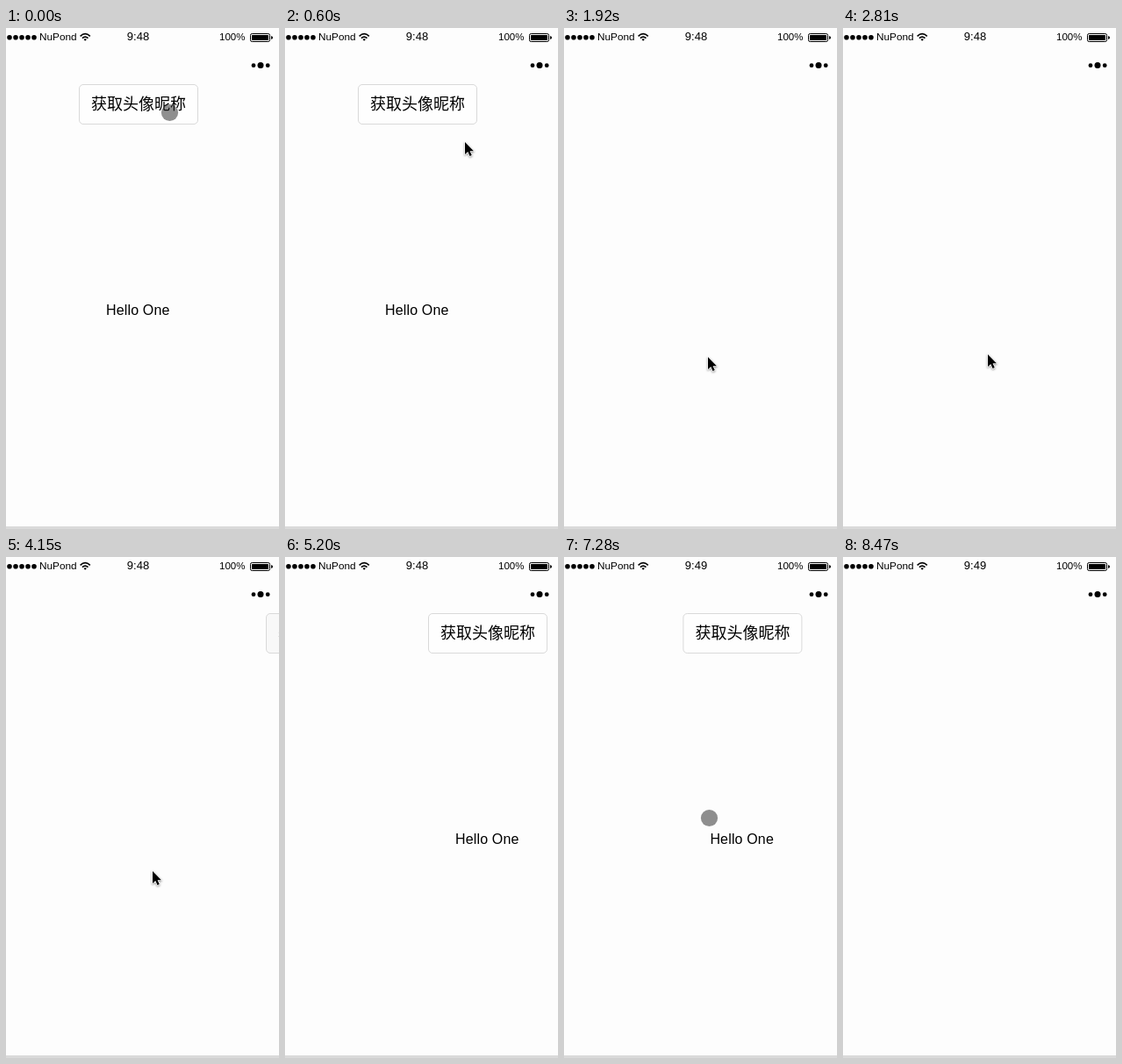
An HTML page for the animation above (8.99 s loop, 311 by 571 pixels).

```html
<!DOCTYPE html>
<html lang="zh-CN">
<head>
<meta charset="utf-8">
<title>Phone screen</title>
<style>
html, body { margin: 0; width: 100%; height: 100%; overflow: hidden; background: #fdfdfd; }
svg { display: block; }
text { font-family: "Liberation Sans", Arial, sans-serif; fill: #000; }
.cjk { font-family: "Noto Sans CJK SC", "Noto Sans CJK", sans-serif; }
.small { font-size: 11.5px; }
.hello { font-size: 16px; letter-spacing: .16px; }
#frame { fill: #fefefe; stroke: #d9d9d9; }
#frame.grey { fill: #f8f8f8; }
#arrow path { filter: drop-shadow(0 1px .8px rgba(0, 0, 0, .4)); }
</style>
</head>
<body>
<svg width="311" height="571" viewBox="0 0 311 571">
  <defs>
    <clipPath id="round"><circle cx="151" cy="99" r="27"/></clipPath>
    <linearGradient id="sky" x2="0" y2="1">
      <stop offset="0" stop-color="#a9c9b4"/>
      <stop offset="1" stop-color="#7fa878"/>
    </linearGradient>
    <linearGradient id="field" x2="0" y2="1">
      <stop offset="0" stop-color="#a0b836"/>
      <stop offset=".5" stop-color="#86ad1c"/>
      <stop offset="1" stop-color="#6f9410"/>
    </linearGradient>
  </defs>

  <rect width="311" height="571" fill="#fdfdfd"/>
  <rect y="568" width="311" height="3" fill="#dadada"/>

  <g id="status">
    <path d="M4 10.7h28.1" stroke="#000" stroke-width="5.6" stroke-linecap="round" stroke-dasharray="0 7"/>
    <text class="small" x="38" y="14" style="font-size:11.8px">NuPond</text>
    <g fill="none" stroke="#000" stroke-width="1.6">
      <path d="M84.6 9.3Q90.2 4.1 95.8 9.3M86.9 11.7Q90.2 8.6 93.5 11.7"/>
      <path d="M88.5 12.9Q90.2 11.5 91.9 12.9L90.2 14.7Z" fill="#000" stroke="none"/>
    </g>
    <text id="clock" x="150.5" y="14" text-anchor="middle" font-size="13">9:48</text>
    <text class="small" x="243" y="14">100%</text>
    <rect x="278.5" y="6.5" width="22" height="9" rx="1.8" fill="none" stroke="#000"/>
    <rect x="280" y="8" width="19" height="6" rx=".6"/>
    <path d="M302 9q2 .4 2 2t-2 2z"/>
  </g>
  <circle cx="282" cy="42.7" r="2.4"/>
  <circle cx="290" cy="42.5" r="3.5"/>
  <circle cx="298.2" cy="42.7" r="2.4"/>

  <g id="page">
    <g id="button">
      <rect id="frame" x="83.5" y="64.5" width="135" height="45" rx="4.5"/>
      <text class="cjk" x="97" y="93" font-size="18">获取头像昵称</text>
    </g>
    <g id="profile">
      <g clip-path="url(#round)">
        <rect x="124" y="72" width="54" height="30" fill="url(#sky)"/>
        <path d="M124 85Q136 79 147 88T178 82V104H124Z" fill="#6b9a80"/>
        <path d="M152 94Q166 80 178 79V104H140Z" fill="#56804a"/>
        <rect x="124" y="101" width="54" height="26" fill="url(#field)"/>
        <path d="M124 98h9l3-2 4 2h8l3-2 4 2h7l3-2 4 2h9v5h-54z" fill="#714f31"/>
        <path d="M140 97h8v4h-8zM155 98h6v4h-6zM168 97h5v4h-5z" fill="#b74c2c"/>
        <path d="M124 109q10-5 22-2l-22 4z" fill="#bf7431"/>
        <path d="M128 115q24-9 50-4v3q-25-5-50 1z" fill="#b8cb49"/>
      </g>
      <text class="cjk" x="103" y="151" font-size="16" style="fill:#aaa">禾禾（岑禾）</text>
    </g>
    <text class="hello" id="hello" x="114" y="327">Hello One</text>
  </g>

  <g id="pointer">
    <g id="touch"><circle r="9.6" fill="#202020" fill-opacity=".5"/></g>
    <g id="arrow">
      <path d="M0 0V14L3.3 11 5.5 16 7.8 15 5.6 10.2H10Z" stroke="#fff" stroke-width="1.6" stroke-linejoin="round" paint-order="stroke"/>
    </g>
    <g id="beam" fill="none">
      <path d="M-3.5-7.5Q0-7.5 0-5V5Q0 7.5-3.5 7.5M3.5-7.5Q0-7.5 0-5M0 5Q0 7.5 3.5 7.5M-2 3H2" stroke="#fff" stroke-width="2.4" stroke-opacity=".7"/>
      <path d="M-3.5-7.5Q0-7.5 0-5V5Q0 7.5-3.5 7.5M3.5-7.5Q0-7.5 0-5M0 5Q0 7.5 3.5 7.5M-2 3H2" stroke="#333"/>
    </g>
  </g>
</svg>
<script>
const LOOP = 8990;
const $ = id => document.getElementById(id);

// [start ms, view, horizontal shift]
const pages = [
  [0, 'button', 0], [300, 'grey', 0], [450, 'button', 0],
  [750, 'profile', 0], [1480, '', 0],
  [3260, 'grey', 80], [3410, '', 0],
  [4150, 'grey', 213], [4300, '', 0],
  [5200, 'button', 80], [5350, 'button', 0], [6390, '', 0],
  [7280, 'button', 52.4], [7430, '', 0],
  [8020, 'button', 130], [8170, '', 0]
];

// [start ms, kind, x, y]
const pointers = [
  [0, 'touch', 186.5, 96.5], [450, 'arrow', 189, 95],
  [600, 'arrow', 205, 130], [750, 'arrow', 211, 196],
  [890, 'arrow', 199, 274], [1040, 'arrow', 178, 342],
  [1180, 'arrow', 165, 371], [1330, 'touch', 163.5, 378],
  [1780, 'arrow', 164, 375], [1930, 'arrow', 167, 377],
  [2080, 'arrow', 171, 379], [2220, 'arrow', 173, 379],
  [2370, 'arrow', 171, 377], [2520, 'arrow', 168, 375],
  [2660, 'arrow', 166, 373], [2810, 'arrow', 165, 372],
  [3260, 'arrow', 166, 369], [3410, 'arrow', 167, 365],
  [3560, 'arrow', 167, 361], [3700, 'arrow', 167, 358],
  [4600, '', 0, 0], [5790, 'arrow', 167, 358],
  [5940, 'arrow', 166, 342], [6090, 'beam', 165.5, 323],
  [7140, 'touch', 165.5, 312], [7280, 'touch', 165.5, 297.5],
  [7580, 'touch', 167, 297.5], [8020, 'touch', 196, 390],
  [8170, 'touch', 220, 480], [8320, 'touch', 236, 549],
  [8470, '', 0, 0]
];

const at = (rows, t) => rows.findLast(row => row[0] <= t);
const show = (id, on) => { $(id).style.display = on ? '' : 'none'; };
const move = (id, x, y) => $(id).setAttribute('transform', `translate(${x} ${y})`);

function draw(t) {
  const [, view, shift] = at(pages, t);
  const profile = view === 'profile';
  show('page', view);
  show('button', !profile);
  show('profile', profile);
  move('page', shift, 0);
  move('hello', 0, profile ? 46 : 0);
  $('frame').classList.toggle('grey', view === 'grey');

  const [, kind, x, y] = at(pointers, t);
  for (const id of ['touch', 'arrow', 'beam']) show(id, id === kind);
  move('pointer', x, y);

  $('clock').textContent = t < 6390 ? '9:48' : '9:49';
}

const start = performance.now();
function tick() {
  draw((performance.now() - start) % LOOP);
  requestAnimationFrame(tick);
}
tick();
</script>
</body>
</html>
```
